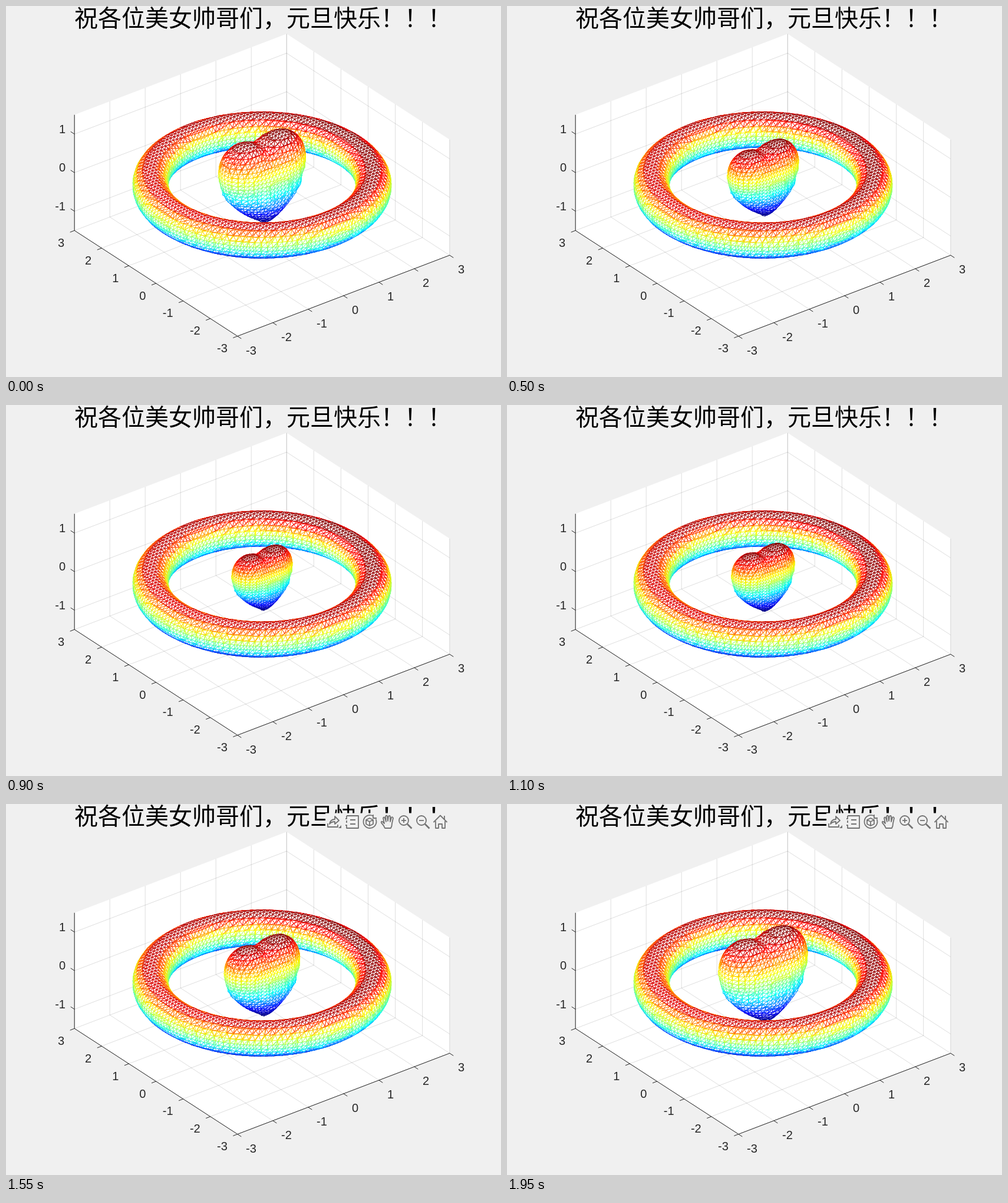
These frames come from a looping animation (840x630 px, 2000 ms). An HTML page with a canvas:

```html
<!DOCTYPE html>
<html lang="zh-CN">
<head>
<meta charset="utf-8">
<title>元旦快乐</title>
<style>
  html, body { margin: 0; width: 100%; height: 100%; overflow: hidden; background: #f0f0f0; }
  svg, canvas { position: absolute; left: 0; top: 0; width: 840px; height: 630px; }
  .grid { stroke: #262626; stroke-opacity: .15; }
  .axis { stroke: #262626; }
  .label { font: 20px "Liberation Sans", Arial, sans-serif; fill: #262626; }
  .title { font: 300 40px "Noto Sans CJK SC", "Noto Sans CJK", sans-serif; fill: #000; }
  #tools { visibility: hidden; fill: none; stroke: #737373; stroke-width: 1.8; stroke-linejoin: round; }
</style>
</head>
<body>
<svg id="plot" viewBox="0 0 840 630">
  <g id="axes"></g>
  <text class="title" x="116" y="34.5">祝各位美女帅哥们，元旦快乐！！！</text>
  <g id="tools">
    <rect x="542" y="15.5" width="210" height="30" fill="#f0f0f0" stroke="none"/>
    <path d="M546 33v6h17v-4M549 34c1-6 5-8 9-8v-5l7 7-7 6v-4q-6 0-9 4z"/>
    <path d="M569 36v5h-5z" fill="#737373" stroke="none"/>
    <path d="M578 20h20v21h-20v-5h-2m2-4v-4m-2-3h2v-5M584 27h9M584 34h9"/>
    <path d="M623 20.500a11 11 0 1 0 4.500 5M623 18v6h6M617 24l6 3v7l-6 3-6-3v-7zM611 27l6 3 6-3M617 30v7"/>
    <path d="M643 41q-2-5-6-9-1-3 2-2l3 3-2-9q1-3 3 0l2 6-1-9q2-3 3 0l1 8 1-8q2-2 3 0v9l2-7q2-2 3 1l-2 9q0 5-2 8z"/>
    <g id="lens">
      <circle cx="675" cy="28" r="8"/>
      <path d="M681 34l7.500 7.500" stroke-width="2.600"/>
      <path d="M671 28h8"/>
    </g>
    <path d="M675 24v8"/>
    <use href="#lens" x="30"/>
    <path d="M725.500 31L737 19.500 748.500 31M729 29v12h5v-7h6v7h5v-12M744 26v-6"/>
  </g>
</svg>
<canvas id="mesh" width="840" height="630"></canvas>
<script>
const start = performance.now();
const W = 840, H = 630;
const project = (x, y, z) => [434.5 + 60 * x - 46.1 * y, 304 - 22.9 * x - 29.9 * y - 65.5 * z];
const nearness = (x, y, z) => -0.527 * x - 0.687 * y + 0.5 * z;

// Axes box

const axes = document.getElementById('axes');

function add(tag, attrs, text = '') {
  const el = document.createElementNS('http://www.w3.org/2000/svg', tag);
  for (const key in attrs) el.setAttribute(key, attrs[key]);
  el.textContent = text;
  axes.append(el);
}

function line(cls, [x1, y1], [x2, y2]) {
  add('line', { class: cls, x1, y1, x2, y2 });
}

function label(value, x, y, anchor) {
  add('text', { class: 'label', x, y, 'text-anchor': anchor }, value);
}

function tick(p, dx, dy) {
  line('axis', p, [p[0] + dx, p[1] + dy]);
}

function drawAxes() {
  const outline = [[-3, 3, -1.5], [-3, 3, 1.5], [3, 3, 1.5], [3, -3, 1.5], [3, -3, -1.5], [-3, -3, -1.5]];
  add('polygon', { points: outline.map(p => project(...p)).join(' '), fill: '#fff' });
  for (let v = -3; v <= 3; v++) {
    line('grid', project(v, -3, -1.5), project(v, 3, -1.5));
    line('grid', project(-3, v, -1.5), project(3, v, -1.5));
    line('grid', project(v, 3, -1.5), project(v, 3, 1.5));
    line('grid', project(3, v, -1.5), project(3, v, 1.5));
  }
  for (let v = -1; v <= 1; v++) {
    line('grid', project(-3, 3, v), project(3, 3, v));
    line('grid', project(3, 3, v), project(3, -3, v));
  }
  const corner = project(-3, -3, -1.5), left = project(-3, 3, -1.5);
  line('axis', corner, project(3, -3, -1.5));
  line('axis', corner, left);
  line('axis', left, project(-3, 3, 1.5));
  for (let v = -3; v <= 3; v++) {
    tick(project(v, -3, -1.5), 6.5, 4.2);
    label(v, 407 + 60 * (v + 3), 592 - 23 * (v + 3), 'start');
    tick(project(-3, v, -1.5), -7.5, 2.9);
    label(v, 99 + 46.15 * (3 - v), 409 + 29.85 * (3 - v), 'end');
    if (Math.abs(v) < 2) {
      tick(project(-3, 3, v), -6.5, -4.2);
      label(v, 101, 281 - 65.5 * v, 'end');
    }
  }
}

// Isosurface meshes

const heart = (x, y, z) =>
  (x * x + 2.25 * y * y + z * z - 1) ** 3 - x * x * z ** 3 - 9 / 80 * y * y * z ** 3;
const torus = (x, y, z) => (Math.hypot(x, y) - 2.5) ** 2 + z * z - 0.16;

// Corner bits are x, y, z; every face winds the same way seen from inside.
const FACES = [[0, 1, 3, 2], [4, 6, 7, 5], [0, 4, 5, 1], [2, 3, 7, 6], [0, 2, 6, 4], [1, 5, 7, 3]];
const N = 100;
const coord = i => -5 + 10 * i / (N - 1);

function jet(f) {
  const part = (up, down) => Math.round(255 * Math.max(0, Math.min(1, 4 * f + up, down - 4 * f)));
  return `rgb(${part(-1.5, 4.5)},${part(-0.5, 3.5)},${part(0.5, 2.5)})`;
}

function isosurface(fn) {
  const values = new Float64Array(N ** 3);
  const lo = 18, hi = 81, zLo = 35, zHi = 64;
  const id = (i, j, k) => (k * N + i) * N + j;
  for (let k = zLo; k <= zHi; k++)
    for (let i = lo; i <= hi; i++)
      for (let j = lo; j <= hi; j++)
        values[id(i, j, k)] = fn(coord(i), coord(j), coord(k));

  const verts = [], tris = [], known = new Map();

  function cell(i, j, k) {
    const at = c => id(i + (c & 1), j + (c >> 1 & 1), k + (c >> 2));
    const val = [], next = new Map();
    let inside = 0;
    for (let c = 0; c < 8; c++) {
      val[c] = values[at(c)];
      if (val[c] < 0) inside++;
    }
    if (inside % 8 === 0) return;

    const crossing = (a, b) => {
      if (a > b) [a, b] = [b, a];
      const key = at(a) * 8 + (a ^ b);
      if (!known.has(key)) {
        const t = val[a] / (val[a] - val[b]);
        const mix = (base, bit) => {
          const p = a >> bit & 1, q = b >> bit & 1;
          return coord(base + p + (q - p) * t);
        };
        known.set(key, verts.length);
        verts.push([mix(i, 0), mix(j, 1), mix(k, 2)]);
      }
      return known.get(key);
    };

    for (const face of FACES)
      for (let s = 0; s < 4; s++) {
        const a = face[s], b = face[(s + 1) % 4];
        if (!(val[a] < 0 && val[b] >= 0)) continue;
        let e = s + 1;
        while (val[face[(e + 1) % 4]] >= 0) e++;
        next.set(crossing(a, b), crossing(face[e % 4], face[(e + 1) % 4]));
      }

    while (next.size) {
      const loop = [];
      let v = next.keys().next().value;
      while (next.has(v)) {
        loop.push(v);
        const following = next.get(v);
        next.delete(v);
        v = following;
      }
      for (let n = 1; n + 1 < loop.length; n++) tris.push([loop[0], loop[n], loop[n + 1]]);
    }
  }

  for (let k = zLo; k < zHi; k++)
    for (let i = lo; i < hi; i++)
      for (let j = lo; j < hi; j++) cell(i, j, k);

  // Colours run through the vertices in the order they were found.
  const colors = verts.map((_, n) => jet((n + 1) / verts.length));
  const points = verts.map(v => project(...v));
  const depth = verts.map(v => nearness(...v));
  return tris.map(t => ({
    pts: t.map(n => points[n]),
    colors: t.map(n => colors[n]),
    near: (depth[t[0]] + depth[t[1]] + depth[t[2]]) / 3
  })).filter(({ pts: [a, b, c] }) =>
    (b[0] - a[0]) * (c[1] - a[1]) - (b[1] - a[1]) * (c[0] - a[0]) < 0
  ).sort((p, q) => p.near - q.near);
}

function paint(ctx, tris, scale) {
  const [ox, oy] = project(0, 0, 0);
  const place = ([x, y]) => [ox + (x - ox) * scale, oy + (y - oy) * scale];
  ctx.fillStyle = '#fff';
  ctx.lineWidth = 1;
  ctx.lineCap = 'round';
  for (const tri of tris) {
    const pts = tri.pts.map(place);
    ctx.beginPath();
    for (const p of pts) ctx.lineTo(...p);
    ctx.fill();
    pts.forEach((p, n) => {
      ctx.strokeStyle = tri.colors[n];
      ctx.beginPath();
      ctx.moveTo(...p);
      ctx.lineTo(...pts[(n + 1) % 3]);
      ctx.stroke();
    });
  }
}

function layer(tris) {
  const canvas = document.createElement('canvas');
  canvas.width = W;
  canvas.height = H;
  paint(canvas.getContext('2d'), tris, 1);
  return canvas;
}

drawAxes();
const ring = isosurface(torus), core = isosurface(heart);
const back = layer(ring.filter(t => t.near < 0));
const front = layer(ring.filter(t => t.near >= 0));
const ctx = document.getElementById('mesh').getContext('2d');
const tools = document.getElementById('tools');
let shown = -1;

// Twenty steps of shrinking by 2 %, then twenty steps back.
function render(now) {
  const step = Math.floor(Math.max(0, now - start) % 2000 / 50);
  if (step !== shown) {
    shown = step;
    ctx.clearRect(0, 0, W, H);
    ctx.drawImage(back, 0, 0);
    paint(ctx, core, 0.98 ** (step < 20 ? step + 1 : 39 - step));
    ctx.drawImage(front, 0, 0);
    tools.style.visibility = step >= 28 ? 'visible' : 'hidden';
  }
  requestAnimationFrame(render);
}
render(start);
</script>
</body>
</html>
```
